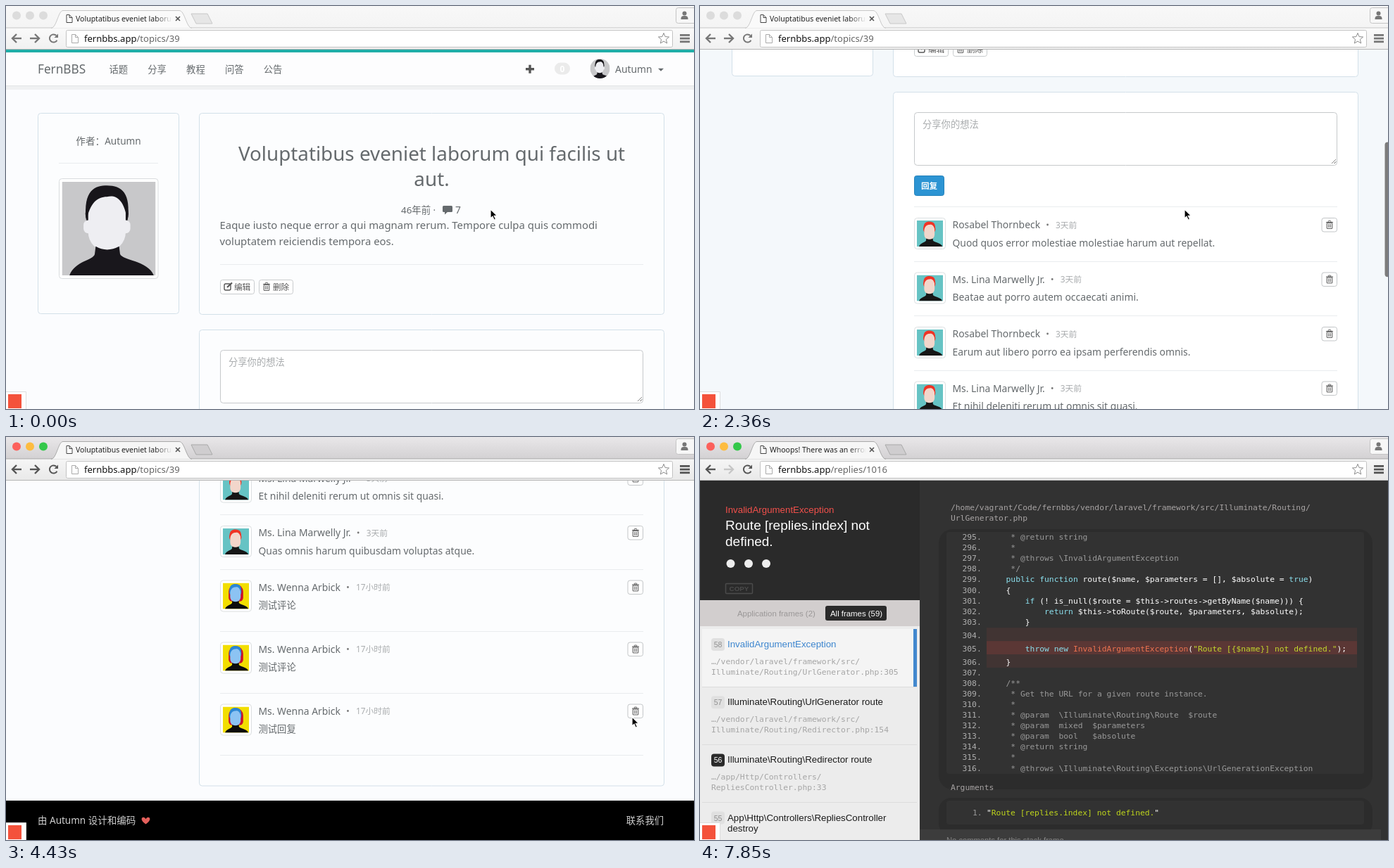
An HTML page with a canvas that plays this animation: 977x573 px, repeating every 8.99 s.

```html
<!DOCTYPE html>
<html lang="zh-CN">
<head>
<meta charset="utf-8">
<title>Forum reply</title>
<style>
html, body { margin: 0; width: 100%; height: 100%; overflow: hidden; background: #fff; }
canvas { display: block; }
</style>
</head>
<body>
<canvas id="stage" width="977" height="573"></canvas>
<script>
const ctx = document.getElementById('stage').getContext('2d');
const W = 977, H = 573, TOP = 62, LOOP = 8990, TICK = 148;
const SANS = '"Noto Sans", "Noto Sans CJK SC", sans-serif';
const ARIAL = '"Liberation Sans", sans-serif';
const MONO = '"DejaVu Sans Mono", monospace';
const INK = '#656a6d', LINE = '#e9ecee';
const MAX_SCROLL = 823, DOC = MAX_SCROLL + H - TOP;

const AT = { active: 30, press: 34, focus: 35, load: 38, error: 42, done: 51, pretty: 52, settled: 53 };
const SCROLL = [[9, 0], [10, 22], [13, 267], [14, 308], [16, 338], [17, 338], [18, 470], [20, 839], [21, 834], [23, 823]];
const POINTER = [[22, 688, 289], [25, 880, 392], [27, 889, 398], [36, 889, 398], [40, 757, 377], [42, 647, 294]];

function track(keys, t) {
  if (t <= keys[0][0]) return keys[0].slice(1);
  for (let i = 1; i < keys.length; i++) {
    const a = keys[i - 1], b = keys[i];
    if (t <= b[0]) {
      const k = (t - a[0]) / (b[0] - a[0]);
      return a.slice(1).map((v, j) => v + (b[j + 1] - v) * k);
    }
  }
  return keys[keys.length - 1].slice(1);
}

function text(s, x, y, size, color, { align = 'left', font = SANS, weight = 400 } = {}) {
  ctx.font = `${weight} ${size}px ${font}`;
  ctx.textAlign = align;
  ctx.fillStyle = color;
  ctx.fillText(s, x, y);
  return ctx.measureText(s).width;
}
function rect(x, y, w, h, color) {
  ctx.fillStyle = color;
  ctx.fillRect(x, y, w, h);
}
function box(x, y, w, h, r, fill, stroke, width = 1) {
  ctx.beginPath();
  ctx.roundRect(x, y, w, h, r);
  if (fill) { ctx.fillStyle = fill; ctx.fill(); }
  if (stroke) { ctx.strokeStyle = stroke; ctx.lineWidth = width; ctx.stroke(); }
}
function disc(x, y, r, color) {
  ctx.beginPath();
  ctx.arc(x, y, r, 0, 7);
  ctx.fillStyle = color;
  ctx.fill();
}
function poly(points, fill, stroke, width = 1, close = true) {
  ctx.beginPath();
  points.forEach(p => ctx.lineTo(p[0], p[1]));
  if (close) ctx.closePath();
  if (fill) { ctx.fillStyle = fill; ctx.fill(); }
  if (stroke) { ctx.strokeStyle = stroke; ctx.lineWidth = width; ctx.stroke(); }
}
function arc(x, y, r, from, to, color, width) {
  ctx.beginPath();
  ctx.arc(x, y, r, from, to);
  ctx.strokeStyle = color;
  ctx.lineWidth = width;
  ctx.stroke();
}
function clipped(x, y, w, h, draw, r = 0) {
  ctx.save();
  ctx.beginPath();
  ctx.roundRect(x, y, w, h, r);
  ctx.clip();
  draw();
  ctx.restore();
}

// Browser window

function arrow(x, dir, color) {
  poly([[x - dir * 7, 46], [x + dir * 6, 46]], null, color, 2.4, false);
  poly([[x, 40], [x + dir * 6, 46], [x, 52]], null, color, 2.4, false);
}
function docIcon(x, y, w, h, color) {
  poly([[x, y], [x + w - 4, y], [x + w, y + 4], [x + w, y + h], [x, y + h]], '#fff', color);
  poly([[x + w - 4, y], [x + w - 4, y + 4], [x + w, y + 4]], null, color, 1, false);
}
function browser(tick) {
  const active = tick >= AT.active, failed = tick >= AT.error;
  const loading = tick >= AT.load && tick < AT.done;
  const dark = active ? '#555' : '#777', edge = active ? '#a9a9a9' : '#c8c8c8';
  const strip = ctx.createLinearGradient(0, 0, 0, 31);
  strip.addColorStop(0, active ? '#e9e7e9' : '#f8f8f8');
  strip.addColorStop(1, active ? '#d3d1d3' : '#f4f4f4');
  rect(0, 0, W, 31, strip);
  const bar = ctx.createLinearGradient(0, 31, 0, 61);
  bar.addColorStop(0, active ? '#f6f6f6' : '#fafafa');
  bar.addColorStop(1, active ? '#e9e9e9' : '#f1f1f1');
  rect(0, 31, W, 30, bar);
  rect(0, 30.5, W, 1, edge);
  rect(0, 61, W, 1, '#b5b5b5');
  (active ? ['#fc605b', '#fdbc40', '#34c84a'] : ['#dcdcdc', '#dcdcdc', '#dcdcdc'])
    .forEach((c, i) => disc(15 + 19 * i, 13.5, 6, c));

  ctx.beginPath();
  ctx.moveTo(64, 31.5);
  ctx.bezierCurveTo(72, 31, 74, 6.5, 81, 6.5);
  ctx.lineTo(246, 6.5);
  ctx.bezierCurveTo(254, 6.5, 256, 31, 264, 31.5);
  ctx.fillStyle = active ? '#f6f6f6' : '#fafafa';
  ctx.fill();
  ctx.strokeStyle = edge;
  ctx.lineWidth = 1;
  ctx.stroke();
  poly([[263, 11], [286, 11], [293, 25], [270, 25]], active ? '#cfcdcf' : '#e6e6e6', edge);
  box(951.5, 2.5, 30, 22, 3, '#f7f7f7', '#c4c4c4');
  disc(963.5, 10.5, 3, '#777');
  box(958.5, 14, 10, 5, [4, 4, 0, 0], '#777');

  if (loading) {
    const a = failed ? -1.2 + (tick - AT.error) * 1.5 : 3.2 - (tick - 40) * 1.1;
    arc(91, 18, 5.5, a, a + 2.2, failed ? '#4a86e8' : '#9a9a9a', 1.7);
  } else docIcon(86, 12.5, 8, 11, '#444');
  const title = failed ? 'Whoops! There was an error.' : 'Voluptatibus eveniet laborum';
  const fade = ctx.createLinearGradient(212, 0, 236, 0);
  fade.addColorStop(0, '#222');
  fade.addColorStop(1, 'rgba(34,34,34,0)');
  clipped(99, 8, 137, 20, () => text(title, 99, 22, 10.5, fade));
  poly([[241, 15], [247, 21]], null, '#555', 1.6);
  poly([[247, 15], [241, 21]], null, '#555', 1.6);

  arrow(15, -1, dark);
  arrow(41, 1, failed ? '#c6c6c6' : dark);
  if (loading) {
    poly([[62, 40.5], [73.5, 51.5]], null, dark, 2.8);
    poly([[73.5, 40.5], [62, 51.5]], null, dark, 2.8);
  } else {
    arc(67.5, 46, 5.6, 0.5, 5.5, dark, 2);
    poly([[74, 39.5], [74, 45], [68.5, 45]], dark);
  }
  box(85.5, 34.5, 861, 24, 2, '#fff', '#c2c2c2');
  docIcon(93.5, 40.5, 9, 12, '#aaa');
  const w = text('fernbbs.app', 111, 51, 13.05, '#111');
  text(failed ? '/replies/1016' : '/topics/39', 111 + w, 51, 13.05, '#666');
  poly(Array.from({ length: 10 }, (_, i) => {
    const r = i % 2 ? 3.6 : 8, a = i * Math.PI / 5 - Math.PI / 2;
    return [934 + r * Math.cos(a), 46.5 + r * Math.sin(a)];
  }), '#fff', '#8b8b8b');
  for (let i = 0; i < 3; i++) rect(957, 40 + 4.7 * i, 14, 2.8, dark);
}

// Forum page

const LOOKS = {
  man: { bg: '#c8c8ca', hair: '#17151a', face: '#eeeef2', top: '#19171c' },
  red: { bg: '#66c3c4', hair: '#ef3325', face: '#f2d6cb', top: '#161616' },
  blue: { bg: '#f2de00', hair: '#2b86d4', face: '#8cc3f3', top: '#0c0c0c', back: '#c9142b' }
};
function portrait(x, y, size, look, round = 0) {
  clipped(x, y, size, size, () => {
    ctx.translate(x, y);
    ctx.scale(size / 100, size / 100);
    rect(0, 0, 100, 100, look.bg);
    if (look.back) box(22, 5, 56, 66, [28, 28, 14, 14], look.back);
    box(25, 16, 46, 36, 20, look.hair);
    if (look === LOOKS.man) box(23, 41, 50, 14, 5, look.face);
    box(28, 12, 40, 62, [18, 18, 20, 20], look.face);
    ctx.beginPath();
    ctx.moveTo(26, 42);
    ctx.bezierCurveTo(22, 8, 36, 4, 48, 4);
    ctx.bezierCurveTo(64, 4, 74, 12, 70, 42);
    ctx.bezierCurveTo(66, 16, 56, 14, 48, 16);
    ctx.bezierCurveTo(38, 16, 30, 22, 26, 42);
    ctx.fillStyle = look.hair;
    ctx.fill();
    ctx.beginPath();
    ctx.moveTo(8, 100);
    ctx.bezierCurveTo(14, 84, 34, 84, 35, 77);
    ctx.lineTo(36, 69);
    ctx.quadraticCurveTo(48, 76, 61, 69);
    ctx.lineTo(62, 77);
    ctx.bezierCurveTo(64, 84, 92, 84, 98, 100);
    ctx.fillStyle = look.top;
    ctx.fill();
  }, round);
}
function trash(x, y, color = '#666') {
  rect(x - 5, y - 4, 10, 1.2, color);
  box(x - 2, y - 5.5, 4, 2, 1, null, color);
  box(x - 3.8, y - 2.5, 7.6, 8, 1, null, color, 1.1);
  for (const dx of [-1.7, 0, 1.7]) rect(x + dx - .4, y - 1, .8, 5, color);
}
function heart(x, y) {
  ctx.beginPath();
  ctx.moveTo(x, y + 5);
  ctx.bezierCurveTo(x - 11, y - 2, x - 4, y - 8, x, y - 2.5);
  ctx.bezierCurveTo(x + 4, y - 8, x + 11, y - 2, x, y + 5);
  ctx.fillStyle = '#e4605c';
  ctx.fill();
}

const MEMBERS = {
  first: ['Rosabel Thornbeck', LOOKS.red, '3天前', 77.5],
  second: ['Ms. Lina Marwelly Jr.', LOOKS.red, '3天前', 77.5],
  third: ['Ms. Wenna Arbick', LOOKS.blue, '17小时前', 88]
};
const REPLIES = [
  ['first', 'Quod quos error molestiae molestiae harum aut repellat.'],
  ['second', 'Beatae aut porro autem occaecati animi.'],
  ['first', 'Earum aut libero porro ea ipsam perferendis omnis.'],
  ['second', 'Et nihil deleniti rerum ut omnis sit quasi.'],
  ['second', 'Quas omnis harum quibusdam voluptas atque.'],
  ['third', '测试评论'], ['third', '测试评论'], ['third', '测试回复']
];

function navbar() {
  rect(0, 62, W, 4, '#20aea8');
  rect(0, 66, W, 47, '#fdfdfe');
  rect(0, 113, W, 1, '#e2e4e5');
  rect(0, 114, W, 5, '#f0f1f2');
  text('FernBBS', 45, 96, 17.2, INK);
  ['话题', '分享', '教程', '问答', '公告'].forEach((s, i) => text(s, 146.5 + 54.8 * i, 94.5, 13.3, INK));
  rect(738, 88, 12, 3.4, '#555');
  rect(742.3, 83.7, 3.4, 12, '#555');
  box(779, 80.5, 22, 17, 8.5, '#ebebeb');
  text('0', 790, 93.5, 12, '#fff', { align: 'center', weight: 700 });
  portrait(829.5, 75, 28, LOOKS.man, 14);
  text('Autumn', 865, 95, 13.9, INK);
  poly([[926, 88.8], [934, 88.8], [930, 92.8]], INK);
}
function topic(panel) {
  const mid = { align: 'center' };
  box(45.5, 152.5, 200, 285, 4, panel, '#d3e0e9');
  text('作者：Autumn', 145.5, 196.5, 13.6, INK, mid);
  rect(75, 223, 141, 1, LINE);
  box(75.5, 245.5, 140.5, 142, 4, '#fff', '#d9dcde');
  portrait(79.5, 250, 133, LOOKS.man);

  box(274.5, 152.5, 660, 286, 4, panel, '#d3e0e9');
  text('Voluptatibus eveniet laborum qui facilis ut', 604.5, 220, 27.8, INK, mid);
  text('aut.', 604.5, 256, 27.8, INK, mid);
  text('46年前 ·', 561, 295, 13.4, INK);
  box(620, 284, 14, 9, 1.5, INK);
  poly([[623, 292], [628, 292], [623, 296.5]], INK);
  text('7', 638, 295, 13.9, INK);
  text('Eaque iusto neque error a qui magnam rerum. Tempore culpa quis commodi', 303.5, 317, 14.9, INK);
  text('voluptatem reiciendis tempora eos.', 303.5, 340, 14.9, INK);
  rect(304, 367, 601, 1, LINE);
  ['编辑', '删除'].forEach((s, i) => {
    box(304.5 + 55 * i, 389.5, 48, 20, 3, '#fff', '#c8cbcd');
    text(s, 324 + 55 * i, 403.5, 11.6, '#555');
  });
  box(310, 395, 9, 9, 2, null, '#555', 1.4);
  poly([[314, 400], [321, 393.5]], null, '#555', 2.2);
  trash(370, 399);
}
function thread(panel, tick) {
  box(274.5, 460.5, 660, 858.5, 4, panel, '#d3e0e9');
  box(304.5, 489.5, 600, 75, 4, '#fff', '#c6c9cb');
  text('分享你的想法', 316, 510.5, 13.3, '#a9acae');
  poly([[897, 562], [903, 556]], null, '#888');
  poly([[900.5, 562], [903, 559.5]], null, '#888');
  box(304.5, 579.5, 42, 28, 3, '#2c94d3', '#2683bb');
  text('回复', 325.5, 598, 11.6, '#fff', { align: 'center', weight: 700 });
  rect(304, 623, 601, 1, LINE);
  let y = 649;
  REPLIES.forEach(([who, body], i) => {
    const [name, look, when, height] = MEMBERS[who];
    box(304.5, y - 9.5, 44, 44, 4, '#fff', '#dcdfe1');
    portrait(308, y - 6, 37, look);
    const end = 358.5 + text(name, 358.5, y + 5, 13.9, INK);
    disc(end + 10.5, y, 1.4, '#777');
    text(when, end + 22, y + 4.5, 11.8, '#aaadaf');
    text(body, 358.5, y + 30.5, who === 'third' ? 13.3 : 13.9, INK);
    const chosen = i === REPLIES.length - 1;
    if (chosen && tick >= AT.focus) box(882.5, y - 10, 22, 20.5, 3, '#e4e6e8', '#5d9fe6', 2);
    else box(883, y - 9.5, 21.5, 19.5, 3, chosen && tick >= AT.press ? '#e2e4e5' : '#fff', '#c3c6c8');
    trash(894, y);
    y += height;
    rect(304, Math.round(y - 26), 601, 1, LINE);
  });
}
function badge(y) {
  box(-.5, y + .5, 29, 25, 0, '#fff', '#ddd');
  rect(3, y + 4, 19, 20, '#f4523b');
}
function forum(tick) {
  const scroll = track(SCROLL, tick)[0], moving = tick >= 10 && tick < 18;
  const panel = moving ? '#fff' : '#fcfdfe';
  rect(0, TOP, W, H - TOP, moving ? '#f4f8fb' : '#fbfcfe');
  ctx.save();
  ctx.translate(0, -scroll);
  navbar();
  topic(panel);
  thread(panel, tick);
  rect(0, 1340, W, 56, '#000');
  text('由 Autumn 设计和编码', 45, 1373, 13.5, '#cfcfcf');
  heart(198.5, 1368.5);
  text('联系我们', 934, 1373, 13.3, '#cfcfcf', { align: 'right' });
  ctx.restore();
  badge(548 - Math.max(0, scroll - MAX_SCROLL));

  const alpha = tick < 10 ? 0 : tick < 26 ? 1 : Math.max(0, 1 - (tick - 25) / 3);
  if (alpha) {
    const view = H - TOP, y = TOP + 2 + scroll / DOC * view;
    ctx.globalAlpha = alpha;
    box(972.5, y, 8, Math.min(view * view / DOC - 4, 571 - y), 4, '#7c7c7c');
    ctx.globalAlpha = 1;
  }
}

// Error page

const FIRST_LINE = 286;
const CODE = String.raw`        return $this->cachedSchema;
    }

    /**
     * Get the URL to a named route.
     *
     * @param  string  $name
     * @param  mixed   $parameters
     * @param  bool  $absolute
     * @return string
     *
     * @throws \InvalidArgumentException
     */
    public function route($name, $parameters = [], $absolute = true)
    {
        if (! is_null($route = $this->routes->getByName($name))) {
            return $this->toRoute($route, $parameters, $absolute);
        }

        throw new InvalidArgumentException("Route [{$name}] not defined.");
    }

    /**
     * Get the URL for a given route instance.
     *
     * @param  \Illuminate\Routing\Route  $route
     * @param  mixed  $parameters
     * @param  bool   $absolute
     * @return string
     *
     * @throws \Illuminate\Routing\Exceptions\UrlGenerationException`.split('\n');
const TOKENS = /("[^"]*"|\b(?:public|function|if|return|throw|new|true)\b|\bInvalidArgumentException\b)/;
const FRAMES = [
  ['58', ['InvalidArgumentException'], ['…/vendor/laravel/framework/src/', 'Illuminate/Routing/UrlGenerator.php:305']],
  ['57', ['Illuminate\\Routing\\UrlGenerator route'], ['…/vendor/laravel/framework/src/', 'Illuminate/Routing/Redirector.php:154']],
  ['56', ['Illuminate\\Routing\\Redirector route'], ['…/app/Http/Controllers/', 'RepliesController.php:33']],
  ['55', ['App\\Http\\Controllers\\RepliesController', 'destroy'], []]
];
const arial = { font: ARIAL }, mono = { font: MONO };
const code = (s, x, y, color) => text(s, x, y, 11.32, color, mono);

function tokenColor(part) {
  if (part[0] === '"') return '#c3d82c';
  if (part === 'InvalidArgumentException') return '#ee7350';
  return TOKENS.test(part) ? '#8be0ee' : '#fff';
}
function codeBlock(tick) {
  const pretty = tick >= AT.pretty, shift = tick >= AT.settled ? 0 : 145.5;
  CODE.forEach((line, i) => {
    const n = FIRST_LINE + i;
    const pad = pretty ? 3.8 * Math.min(3, Math.max(0, n - 303)) : 0;
    const y = 142 + 15.1 * (n - 295) + pad + shift;
    if (!pretty) return code(line, 360, y + 4, '#fff');
    if (n >= 304 && n <= 306) rect(407, y - 10.5, 526, 19, n === 305 ? '#5b3735' : '#413433');
    code(n + '.', 372.5, y + 4, '#b0b0b0');
    if (/^\s*(\/\*|\*)/.test(line)) return code(line, 407.3, y + 4, '#999');
    let x = 407.3;
    for (const part of line.split(TOKENS)) if (part) x += code(part, x, y + 4, tokenColor(part));
  });
}
function sidebar() {
  rect(0, TOP, 312, 170, '#2a2a2a');
  text('InvalidArgumentException', 36, 108, 13.3, '#f2504b', arial);
  text('Route [replies.index] not', 36, 132, 19, '#fff', arial);
  text('defined.', 36, 154.5, 19, '#fff', arial);
  for (const x of [43.5, 69, 94]) disc(x, 180, 6, '#eee');
  box(36.5, 208.5, 38, 14, 1, null, '#4b4b4b', 1.5);
  text('COPY', 55.5, 219, 9.8, '#4b4b4b', { align: 'center', font: ARIAL, weight: 700 });

  rect(0, 232, 312, 341, '#ececec');
  rect(0, 232, 312, 37, '#d2cece');
  text('Application frames (2)', 53, 255, 11.4, '#9a9797', arial);
  box(178, 240, 87, 21, 3, '#2a2a2a');
  text('All frames (59)', 185, 255, 11.4, '#fff', arial);
  rect(3, 273, 305, 82, '#f4f4f4');
  rect(303, 273, 5, 82, '#4288ce');
  FRAMES.forEach(([id, titles, paths], i) => {
    const y = 294.5 + 82.2 * i, own = id === '56';
    box(16, y - 8.5, 19, 18, 4, own ? '#2a2a2a' : '#e0e0e0');
    text(id, 25.5, y + 4.5, 10.5, own ? '#fff' : '#8f8f8f', { align: 'center', font: ARIAL });
    titles.forEach((s, j) => text(s, 39, y + 4.5 + 15 * j, 13.3, i ? '#1c1c1c' : '#3d86cf', arial));
    paths.forEach((s, j) => code(s, 16, y + 28 + 15 * j, '#a5a5a5'));
    if (i < 3) rect(3, 355 + 82 * i, 305, 1, '#dcdcdc');
  });
}
function errorPage(tick) {
  rect(0, TOP, W, H - TOP, '#323232');
  sidebar();
  code('/home/vagrant/Code/fernbbs/vendor/laravel/framework/src/Illuminate/Routing/', 356, 104, '#a8a4a4');
  code('UrlGenerator.php', 356, 119, '#a8a4a4');
  box(339, 131, 616, 370, 20, '#2c2c2c');
  box(350, 135, 593, 344, 4, '#323232');
  clipped(350, 135, 593, 344, () => codeBlock(tick));
  code('Arguments', 356, 502, '#a8a4a4');
  box(339, 513, 616, 54, 18, '#2c2c2c');
  box(350, 517, 593, 34, 4, '#323232');
  code('1.', 387, 538, '#999');
  let x = 407;
  x += code('"', x, 538, '#fff');
  x += code('Route [replies.index] not defined.', x, 538, '#bfd61c');
  code('"', x, 538, '#fff');
  rect(312, 558, 655, 15, '#3c3c3c');
  text('No comments for this stack frame.', 350, 577, 11.2, '#858585', arial);
  if (tick < AT.done) {
    box(-1.5, 557.5, 327, 20, 3, '#f3f3f3', '#c9c9c9');
    text('Waiting for fernbbs.app...', 2, 569.5, 10.6, '#222', arial);
  } else badge(548);
}

function pointer(tick) {
  if (tick >= AT.settled) return;
  const [x, y] = track(POINTER, tick);
  if (tick >= AT.error) {
    const beam = [[[x - 3, y - 7], [x, y - 5], [x + 3, y - 7]], [[x, y - 5], [x, y + 5]],
      [[x - 3, y + 7], [x, y + 5], [x + 3, y + 7]], [[x - 2, y + 2], [x + 2, y + 2]]];
    beam.forEach(p => poly(p, null, '#c8c8c8', 1.2, false));
    return;
  }
  const shape = [[0, 0], [0, 13], [3, 10.2], [5.2, 15.2], [7.5, 14.2], [5.3, 9.3], [9.5, 9.3]];
  poly(shape.map(([a, b]) => [x + a, y + b]), '#000', '#fff', 1.2);
}

function draw(now) {
  const tick = Math.floor((now % LOOP + 12) / TICK);
  ctx.clearRect(0, 0, W, H);
  clipped(0, TOP, W, H - TOP, () => (tick < AT.error ? forum : errorPage)(tick));
  browser(tick);
  pointer(tick);
  requestAnimationFrame(draw);
}
requestAnimationFrame(draw);
</script>
</body>
</html>
```
